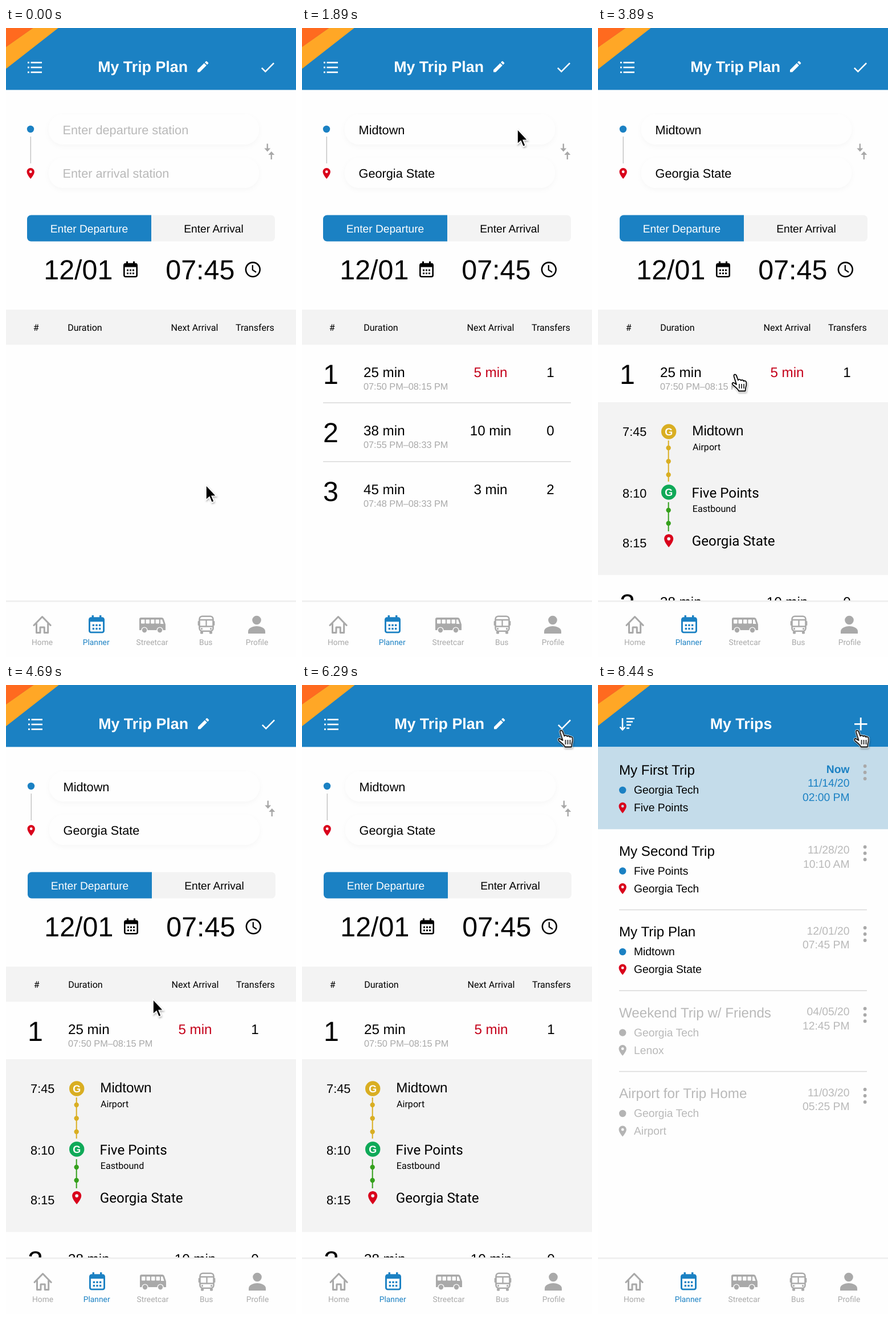
An HTML page that plays this animation: 509x1101 px, repeating every 8.49 s.

```html
<!DOCTYPE html>
<html lang="en">
<head>
<meta charset="utf-8">
<title>Trip planner</title>
<style>
  html, body { margin: 0; width: 100%; height: 100%; overflow: hidden; background: #fefefe; }
  svg { position: fixed; left: 0; top: 0; display: block; }
  text { font-family: "Liberation Sans", Arial, sans-serif; white-space: pre; text-rendering: geometricPrecision; }
  .rb { font-family: Roboto, sans-serif; }
  .b { font-weight: 700; }
  .cut, #app, #list { animation: 8.49s step-end infinite; }
  #app { animation-name: nudge; }
  #list { animation-name: drop; }
  #plan { animation-name: plan; }
  #hint { animation-name: hint; }
  #filled { animation-name: filled; }
  #detail { animation-name: detail; }
  #trips { animation-name: trips; }
  #arrow { animation-name: arrow; }
  #hand { animation-name: hand; }
  #cursor { animation: travel 8.49s linear infinite; }

  /* screen changes: fill 17.08%, expand 38.87%, save 74.2% */
  @keyframes plan { 0% { opacity: 1 } 74.2%, 100% { opacity: 0 } }
  @keyframes hint { 0% { opacity: 1 } 17.08%, 100% { opacity: 0 } }
  @keyframes filled { 0% { opacity: 0 } 17.08%, 100% { opacity: 1 } }
  @keyframes detail { 0% { opacity: 0 } 38.87%, 100% { opacity: 1 } }
  @keyframes trips { 0% { opacity: 0 } 74.2%, 100% { opacity: 1 } }
  @keyframes drop { 0% { transform: none } 38.87%, 100% { transform: translateY(300px) } }
  @keyframes nudge { 0% { transform: none } 38.87% { transform: translateX(1px) } 74.2%, 100% { transform: none } }

  @keyframes arrow {
    0% { opacity: 1 } 12.4% { opacity: 0 } 17.08% { opacity: 1 }
    31.2% { opacity: 0 } 54.5% { opacity: 1 } 66%, 100% { opacity: 0 }
  }
  @keyframes hand {
    0% { opacity: 0 } 12.4% { opacity: 1 } 17.08% { opacity: 0 }
    31.2% { opacity: 1 } 54.5% { opacity: 0 } 66%, 100% { opacity: 1 }
  }
  @keyframes travel {
    0%, 3.5% { transform: translate(351px, 800px); animation-timing-function: ease-in }
    6.5% { transform: translate(345px, 677px) }
    8% { transform: translate(345px, 548px) }
    9.2% { transform: translate(350px, 445px) }
    11% { transform: translate(360px, 290px); animation-timing-function: ease-out }
    13%, 24% { transform: translate(378px, 177px); animation-timing-function: ease-in }
    28% { transform: translate(330px, 400px); animation-timing-function: ease-out }
    32%, 39% { transform: translate(241px, 599px); animation-timing-function: ease-in-out }
    42%, 52% { transform: translate(241px, 607px); animation-timing-function: ease-in }
    56% { transform: translate(265px, 527px) }
    59% { transform: translate(325px, 383px) }
    62% { transform: translate(375px, 220px); animation-timing-function: ease-out }
    64.5%, 65.5% { transform: translate(452px, 82px) }
    66.5%, 100% { transform: translate(455.5px, 80px) }
  }
</style>
</head>
<body>
<svg id="root" width="509" height="1101" viewBox="0 0 509 1101"></svg>
<script>
const BLUE = '#1b81c3', RED = '#d9001b', GREY = '#a9a9a9', PALE = '#b9b9b9', PANEL = '#f3f3f3';

const text = (s, x, y, size, fill = '#000', anchor = 'start', cls = '') =>
  `<text x="${x}" y="${y}" font-size="${size}" fill="${fill}" text-anchor="${anchor}" class="${cls}">${s}</text>`;
const roboto = (s, x, y, size, fill, anchor) => text(s, x, y, size, fill, anchor, 'rb');
const rect = (x, y, w, h, fill, rx = 0, more = '') =>
  `<rect x="${x}" y="${y}" width="${w}" height="${h}" rx="${rx}" fill="${fill}" ${more}/>`;
const dot = (x, y, r, fill) => `<circle cx="${x}" cy="${y}" r="${r}" fill="${fill}"/>`;
const fill = (d, color, more = '') => `<path d="${d}" fill="${color}" ${more}/>`;
const line = (d, color, w = 1.5, more = '') =>
  `<path d="${d}" fill="none" stroke="${color}" stroke-width="${w}" ${more}/>`;
const at = (x, y, k, body) => `<g transform="translate(${x} ${y}) scale(${k})">${body}</g>`;
const cut = (id, body) => `<g id="${id}" class="cut">${body}</g>`;
const rule = y => line(`M37 ${y}H472`, '#d9d9d9');

const pin = (x, y, k = .95, color = RED) => at(x - 12 * k, y - 12 * k, k, fill(
  'M12 2C8.1 2 5 5.1 5 9c0 5.25 7 13 7 13s7-7.75 7-13c0-3.9-3.1-7-7-7zM12 11.5a2.5 2.5 0 0 1 0-5 2.5 2.5 0 0 1 0 5z',
  color, 'fill-rule="evenodd"'));

const calendar = (x, y, k, color) => {
  let s = rect(1.3, 4.3, 22.4, 22.4, 'none', 2.5, `stroke="${color}" stroke-width="2.6"`) +
    rect(1, 3.5, 23, 6.5, color, 2) + rect(5, 0, 3, 5, color) + rect(17, 0, 3, 5, color);
  for (const cy of [14, 19.5])
    for (const cx of [6, 11, 16]) s += rect(cx, cy, 3, 3, color);
  return at(x, y, k, s);
};

function header() {
  return rect(-2, 0, 515, 108.4, BLUE) +
    fill('M47 0H91.7L-3 73.7V35Z', '#ffa726') + fill('M-3 0H47.5L-3 35.500Z', '#ff6a1f');
}

function planTop() {
  let s = '';
  for (const y of [60.5, 69, 77.5]) s += rect(38, y - 1.4, 2.8, 2.8, '#fff') + rect(43.5, y - 1.3, 19.5, 2.6, '#fff');
  s += text('My Trip Plan', 161.2, 77, 26.8, '#fff', 'start', 'b');
  s += at(332.8, 54.8, 1.07, fill('M3 17.25V21h3.75L17.8 9.94l-3.75-3.75zM20.7 7.04a1 1 0 0 0 0-1.41l-2.34-2.34a1 1 0 0 0-1.41 0l-1.83 1.83 3.75 3.75z', '#fff'));
  s += at(443.5, 53.2, 1.31, fill('M9 16.2L4.8 12l-1.4 1.4L9 19 21 7l-1.4-1.4z', '#fff'));

  for (const y of [151, 227]) s += rect(75, y, 369, 53, '#fefefe', 26, 'filter="url(#soft)"');
  s += dot(43, 177, 6.2, BLUE) + line('M43.3 190V237', '#c4c4c4') + pin(43.2, 254.5);
  s += fill('M457.6 202.5h2.4v8h4.3l-5.5 6-5.5-6h4.3zM464.6 230h2.4v-8h4.3l-5.5-6-5.5 6h4.3z', '#a8a8a8');

  s += rect(37, 327.5, 435, 46, PANEL, 7);
  s += fill('M255 327.5V373.5H44a7 7 0 0 1-7-7V334.5a7 7 0 0 1 7-7Z', BLUE);
  s += text('Enter Departure', 146, 357.5, 19.2, '#fff', 'middle') + text('Enter Arrival', 364.5, 357.5, 19.2, '#000', 'middle');
  s += text('12/01', 66.3, 439.8, 48.4) + text('07:45', 280.3, 439.8, 48.4);
  s += calendar(206, 408.5, 1, '#000');
  s += `<circle cx="433.3" cy="422.8" r="12.4" fill="none" stroke="#000" stroke-width="2.6"/>` + line('M432.8 415V423.5L439 427.5', '#000', 2.2);

  s += rect(-2, 493, 515, 61.5, PANEL);
  return s + roboto('#', 47.8, 530.2, 16.1) + roboto('Duration', 108.2, 530.2, 16.1) +
    roboto('Next Arrival', 331, 530.2, 16.1, '#000', 'middle') + roboto('Transfers', 436.8, 530.2, 16.1, '#000', 'middle');
}

function option(n, mins, span, next, changes) {
  const y = (n - 1) * 102.5;
  return text(n, 37, 622.7 + y, 48.4) + text(mins + ' min', 108, 610.7 + y, 24.2) +
    text(span, 108, 632.5 + y, 16.3, GREY) +
    text(next + ' min', 331, 610.7 + y, 24.2, n === 1 ? '#c4001a' : '#000', 'middle') +
    text(changes, 436, 610.7 + y, 24.2, '#000', 'middle');
}

function legs() {
  const gold = '#d9ae22', green = '#0fa958', leaf = '#35a01c';
  let s = rect(-2, 655, 515, 302.5, PANEL);
  s += line('M122.7 722V794', gold, 2) + line('M122.7 830V881', leaf, 2);
  for (const y of [735, 758.5, 782]) s += dot(122.7, y, 4.2, gold);
  for (const y of [844, 867]) s += dot(122.7, y, 4.2, leaf);
  for (const [y, c] of [[706.5, gold], [812.5, green]])
    s += dot(123.2, y, 13.2, c) + text('G', 123.2, y + 6.5, 18, '#fff', 'middle', 'b');
  s += pin(123.2, 897.5, 1.15);
  for (const [t, y] of [['7:45', 714], ['8:10', 821.5], ['8:15', 908.5]]) s += text(t, 84.3, y, 21.7, '#000', 'end');
  return s + text('Midtown', 164.3, 713, 24.2) + roboto('Airport', 165, 738.5, 16.1) +
    roboto('Five Points', 163.6, 821.5, 24.2) + roboto('Eastbound', 164.8, 847, 16.1) +
    roboto('Georgia State', 163.8, 906, 24.2);
}

function trip(i, title, from, to, date, time) {
  const old = i > 2, ink = old ? PALE : '#000', y = i * 141.5;
  const when = i ? PALE : BLUE;
  let s = text(title, 36.9, 157.3 + y, 24.2, ink);
  s += dot(43.2, 184 + y, 6.2, old ? '#b4b4b4' : BLUE) + text(from, 63, 190.2 + y, 19.3, ink);
  s += pin(43.2, 215 + y, .95, old ? '#b4b4b4' : RED) + text(to, 63, 221.3 + y, 19.3, ink);
  const lines = i ? [date, time] : ['Now', date, time];
  lines.forEach((t, k) => s += text(t, 441.5, 153.5 + 24.5 * k + y, 19.3, when, 'end', t === 'Now' ? 'b' : ''));
  for (const d of [142, 153, 164]) s += dot(468.6, d + y, 2.9, GREY);
  if (i && i < 4) s += rule(252 + y);
  return s;
}

function tripList() {
  let s = line('M43 58V78M38.5 73.5L43 78.5L47.5 73.5', '#fff', 2.5);
  [14, 11, 8, 5].forEach((w, k) => s += rect(50, 57.5 + k * 5.6, w, 2.5, '#fff'));
  s += text('My Trips', 251, 77, 26.8, '#fff', 'middle', 'b') + line('M450 68.3H472.5M461.2 57V79.5', '#fff', 2.8);
  s += rect(-2, 108.4, 515, 144, '#c4dcea');
  return s + [
    ['My First Trip', 'Georgia Tech', 'Five Points', '11/14/20', '02:00 PM'],
    ['My Second Trip', 'Five Points', 'Georgia Tech', '11/28/20', '10:10 AM'],
    ['My Trip Plan', 'Midtown', 'Georgia State', '12/01/20', '07:45 PM'],
    ['Weekend Trip w/ Friends', 'Georgia Tech', 'Lenox', '04/05/20', '12:45 PM'],
    ['Airport for Trip Home', 'Georgia Tech', 'Airport', '11/03/20', '05:25 PM']
  ].map((t, i) => trip(i, ...t)).join('');
}

function nav() {
  let s = rect(-2, 1003, 515, 100, '#fefefe') + rect(-2, 1002, 515, 2.5, '#eeeeee');
  s += line('M49 1045.5L63.6 1030.5L78.2 1045.5M53.5 1042V1058.5H60V1049H67.3V1058.5H73.7V1042', GREY, 3, 'stroke-linejoin="round" stroke-linecap="round"');
  s += calendar(145, 1028, 1.12, BLUE);
  // streetcar
  s += fill('M237 1032H273Q276 1032 277 1035L280 1044V1054H234V1035Q234 1032 237 1032Z', GREY);
  for (const x of [237, 245.5, 254, 262.5]) s += rect(x, 1035.5, 6.5, 7, '#fefefe', 1);
  s += fill('M271 1035.5H274L276.5 1043H271Z', '#fefefe');
  for (const x of [243, 270]) s += dot(x, 1054, 5.6, '#fefefe') + dot(x, 1054, 4.2, GREY);
  // bus
  s += rect(339.5, 1029.7, 24, 26, 'none', 5, `stroke="${GREY}" stroke-width="2.6"`);
  s += line('M340 1036H363M340 1047.5H363M351.5 1036V1047', GREY, 2.3);
  for (const x of [336.7, 364.1]) s += rect(x, 1038, 2.2, 8, GREY, 1);
  for (const x of [341, 357]) s += rect(x, 1056, 5, 4.5, GREY, 1.5) + dot(x + 2.5, 1051.7, 1.6, GREY);
  // person
  s += dot(440, 1036.5, 7.8, GREY) + fill('M425 1060V1056C425 1050 434 1047 440 1047S455 1050 455 1056V1060Z', GREY);
  [['Home', 63.5], ['Planner', 158.2], ['Streetcar', 256.5], ['Bus', 350.7], ['Profile', 440.5]]
    .forEach(([t, x], i) => s += roboto(t, x, 1079.5, 13.8, i === 1 ? BLUE : GREY, 'middle'));
  return s;
}

function cursor() {
  const body = 'M-2.5 2.5C-3 0-.5-2 1.5.5C2 1.5 4 7 5 9.5C5.5 7.8 9 7.5 10 10C11 8.5 14 8.8 14.5 11C16 10 19 10.5 19.4 13.5C20 17.5 19.5 19.5 18 23.5L17.5 28.5H6C5 25 0 21.5-3 19C-7.5 15.5-5 12.5-1 15L2 17Z';
  return cut('arrow', fill('M0 0V26L6 20.8L10 30.5L14.2 28.8L10.2 19.2H18Z', '#000', 'stroke="#fff" stroke-width="1.6" filter="url(#shade)"')) +
    cut('hand', `<g filter="url(#shade)">` + line(body, '#fff', 3.4) +
      fill(body, '#fff', 'stroke="#000" stroke-width="1.8" stroke-linejoin="round"') +
      line('M7 16V24M11 16V24M15 16V24', '#000', 1.5) + '</g>');
}

document.getElementById('root').innerHTML = `<defs>
  <filter id="soft" x="-10%" y="-40%" width="120%" height="190%"><feDropShadow dx="0" dy="3" stdDeviation="4" flood-opacity=".03"/></filter>
  <filter id="shade" x="-40%" y="-40%" width="190%" height="190%"><feDropShadow dx="1" dy="2" stdDeviation="1.5" flood-opacity=".3"/></filter>
</defs>` +
  `<g id="app">` + header() +
  cut('plan', planTop() +
    cut('hint', text('Enter departure station', 99.6, 186, 21.7, PALE) + text('Enter arrival station', 99.6, 262, 21.7, PALE)) +
    cut('filled', text('Midtown', 99.6, 186, 21.7) + text('Georgia State', 99.6, 262, 21.7) +
      option(1, 25, '07:50 PM–08:15 PM', 5, 1) + rule(656) +
      `<g id="list">` + option(2, 38, '07:55 PM–08:33 PM', 10, 0) + rule(759) +
      option(3, 45, '07:48 PM–08:33 PM', 3, 2) + '</g>' +
      cut('detail', legs()))) +
  cut('trips', tripList()) + nav() + '</g>' +
  `<g id="cursor">${cursor()}</g>`;
</script>
</body>
</html>
```
